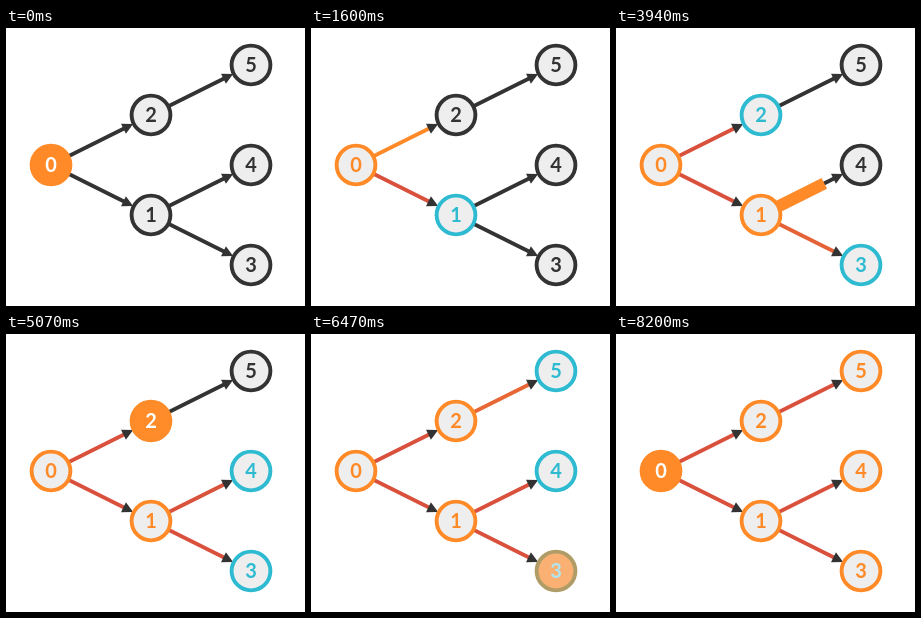
An HTML page with a canvas that plays this animation: 299 px wide and 278 px high, repeating every 8.4 s.

```html
<!DOCTYPE html>
<html lang="en">
<head>
<meta charset="utf-8">
<title>Breadth-first search</title>
<style>
  html, body { margin: 0; width: 100%; height: 100%; overflow: hidden; background: #fff; }
  canvas { display: block; }
</style>
</head>
<body>
<canvas id="stage" width="299" height="278"></canvas>
<script>
const ctx = document.getElementById('stage').getContext('2d');
const LOOP = 8400;
const TICK = 1000 / 15;
const DURATION = 5.5; // in ticks

const DARK = [51, 51, 51], ORANGE = [255, 138, 39], CYAN = [46, 187, 209];
const RED = [217, 81, 60], LIGHT = [238, 238, 238], WHITE = [255, 255, 255];

// Each look is [ring, fill, text].
const LOOKS = {
  idle: [DARK, LIGHT, DARK],
  queued: [CYAN, LIGHT, CYAN],
  active: [ORANGE, ORANGE, WHITE],
  visited: [ORANGE, LIGHT, ORANGE]
};

const NODES = [[45, 137], [145, 187], [145, 87], [245, 237], [245, 137], [245, 37]];
const EDGES = ['01', '02', '13', '14', '25'];

// Start tick of each step, node looks it fades to, edge it traces, edge it turns red.
const STEPS = [
  { at: 2.8, nodes: { 0: 'visited' }, trace: '01' },
  { at: 11, nodes: { 1: 'queued' } },
  { at: 18, trace: '02', done: '01' },
  { at: 26, nodes: { 2: 'queued' } },
  { at: 33.3, nodes: { 1: 'active' }, done: '02' },
  { at: 41, nodes: { 1: 'visited' }, trace: '13' },
  { at: 49, nodes: { 3: 'queued' } },
  { at: 55.8, trace: '14', done: '13' },
  { at: 63.8, nodes: { 4: 'queued' } },
  { at: 71.3, nodes: { 2: 'active' }, done: '14' },
  { at: 79.2, nodes: { 2: 'visited' }, trace: '25' },
  { at: 86.8, nodes: { 5: 'queued' } },
  { at: 94, nodes: { 3: 'active' }, done: '25' },
  { at: 102, nodes: { 3: 'visited', 4: 'active' } },
  { at: 109.5, nodes: { 4: 'visited', 5: 'active' } },
  { at: 117.5, nodes: { 5: 'visited', 0: 'active' } }
];

const clamp = x => Math.max(0, Math.min(1, x));
const ease = x => x < 0.5 ? 4 * x ** 3 : 1 - 4 * (1 - x) ** 3;
const mix = (a, b, p) => a.map((v, i) => v + (b[i] - v) * p);
const css = c => `rgb(${c.map(Math.round).join()})`;
const progress = (step, tick) => ease(clamp((tick - step.at) / DURATION));

function line(x1, y1, x2, y2, width, color) {
  ctx.beginPath();
  ctx.moveTo(x1, y1);
  ctx.lineTo(x2, y2);
  ctx.lineWidth = width;
  ctx.strokeStyle = css(color);
  ctx.stroke();
}

function drawEdge(id, tick) {
  const [ax, ay] = NODES[id[0]], [bx, by] = NODES[id[1]];
  const length = Math.hypot(bx - ax, by - ay) - 40;
  let color = DARK, traced = 0;
  for (const step of STEPS) {
    const p = progress(step, tick);
    if (step.trace === id) {
      if (p >= 1) color = ORANGE;
      else traced = p;
    }
    if (step.done === id) color = mix(color, RED, p);
  }

  ctx.save();
  ctx.translate(ax, ay);
  ctx.rotate(Math.atan2(by - ay, bx - ax));
  ctx.translate(20, 0);
  line(0, 0, length - 4, 0, 3.8, color);
  ctx.beginPath();
  ctx.moveTo(length, 0);
  ctx.lineTo(length - 10.8, -5.5);
  ctx.lineTo(length - 10.8, 5.5);
  ctx.fillStyle = css(DARK);
  ctx.fill();
  if (traced > 0) line(0, 0, length * traced, 0, 12, ORANGE);
  ctx.restore();
}

function drawNode([x, y], id, tick) {
  let look = id === 0 ? LOOKS.active : LOOKS.idle;
  for (const step of STEPS) {
    const next = step.nodes && step.nodes[id];
    if (!next) continue;
    const p = progress(step, tick);
    look = look.map((c, i) => mix(c, LOOKS[next][i], p));
  }
  const [ring, fill, text] = look.map(css);
  ctx.beginPath();
  ctx.arc(x, y, 19.4, 0, 2 * Math.PI);
  ctx.fillStyle = fill;
  ctx.fill();
  ctx.lineWidth = 3.9;
  ctx.strokeStyle = ring;
  ctx.stroke();
  ctx.fillStyle = text;
  ctx.fillText(id, x, y + 7);
}

function draw(ms) {
  const tick = Math.floor((ms % LOOP) / TICK + 0.001);
  ctx.fillStyle = '#fff';
  ctx.fillRect(0, 0, 299, 278);
  ctx.font = 'bold 20px Lato, sans-serif';
  ctx.textAlign = 'center';
  EDGES.forEach(id => drawEdge(id, tick));
  NODES.forEach((pos, id) => drawNode(pos, id, tick));
}

const start = performance.now();
function loop() {
  draw(performance.now() - start);
  requestAnimationFrame(loop);
}
loop();
</script>
</body>
</html>
```
